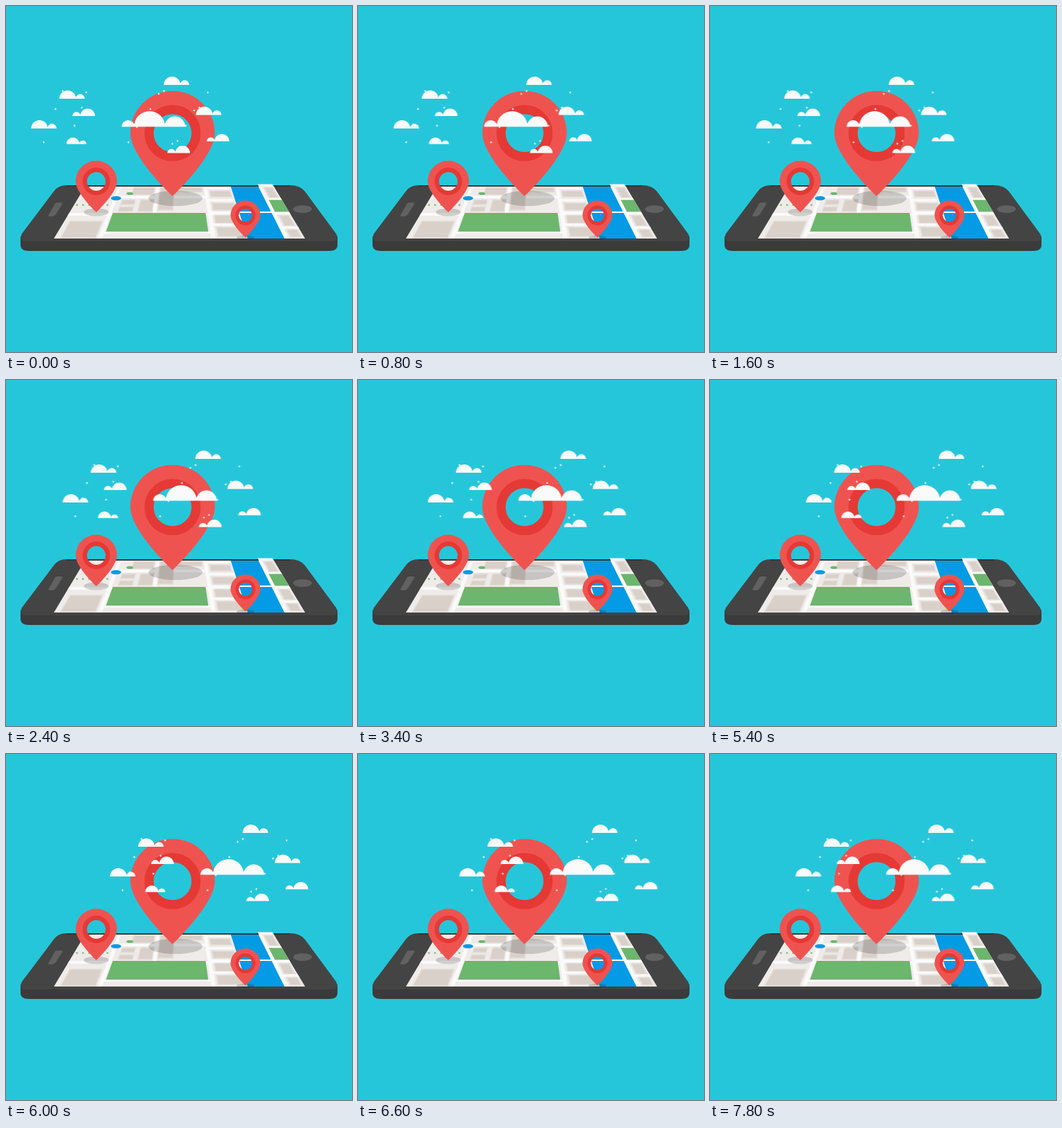
Recreate the animation shown at these times as an HTML page. Size 500 by 500 pixels, loop 8 s.

```html
<!DOCTYPE html>
<html lang="en">
<head>
<meta charset="utf-8">
<title>Map pins on a phone</title>
<style>
  html, body { margin: 0; width: 100%; height: 100%; overflow: hidden; background: #26c6da; }
  svg { display: block; width: 100%; height: 100%; }
  /* The sky moves in 200 ms steps: 31 to the right, then back. */
  #sky { fill: #fafafa; animation: drift 8s infinite; }
  @keyframes drift {
    0% { transform: translateX(0); animation-timing-function: steps(31); }
    77.5% { transform: translateX(117.8px); animation-timing-function: steps(9); }
    100% { transform: translateX(83.6px); }
  }
  .land { fill: #efebe9; }
  .block { fill: #d9d0c9; stroke: #e5dfda; stroke-width: 1.6; }
  .road { fill: #fafafa; }
  .park { fill: #6cb66e; }
  .water { fill: #039be5; }
  .shade { opacity: .17; }
  .key { fill: #616161; }
</style>
</head>
<body>
<svg viewBox="0 0 500 500">
  <defs>
    <g id="pin">
      <path fill="#ef5350" fill-rule="evenodd" d="M0 91S-61 34-61 0A61 61 0 0 1 61 0C61 34 0 91 0 91ZM-34 0A34 34 0 0 0 34 0A34 34 0 0 0-34 0Z"/>
      <circle r="34" fill="none" stroke="#e53935" stroke-width="13.2"/>
    </g>
    <path id="cloud" d="M-12 0A12 12 0 0 1 12 0ZM11.500 0A6.700 6.700 0 0 1 24.900 0Z"/>
    <path id="star" d="M0-2 .6-.6 2 0 .6.6 0 2-.6.6-2 0-.6-.6Z"/>
  </defs>

  <path fill="#3b3b3b" d="M21 333V345Q21 354 33 354H467Q479 354 479 345V333L400 300H100Z"/>
  <path fill="#444" d="M88 259H410Q425 259 432 268L477 329Q482 340 471 340H29Q18 340 23 329L69 268Q75 259 88 259Z"/>
  <path fill="#353535" d="M88 259H410V261H88Z"/>
  <path class="key" d="M73 284H79Q83 284 81 287L72 301Q70 304 67 304H63Q60 304 62 301L70 287Q71 284 73 284Z"/>
  <ellipse class="key" cx="428.5" cy="293.5" rx="13.5" ry="5.5"/>

  <g id="map"></g>
  <ellipse class="water" cx="159" cy="277.8" rx="7.5" ry="3"/>
  <ellipse class="park" cx="179" cy="271" rx="5" ry="2"/>
  <path stroke="#6cb66e" stroke-width="2.6" stroke-linecap="round" stroke-dasharray="0 8.8" d="M102.500 287.500H148"/>

  <ellipse class="shade" cx="245" cy="278" rx="39" ry="11"/>
  <ellipse class="shade" cx="130.5" cy="298" rx="18" ry="5.5"/>
  <ellipse class="shade" cx="346" cy="334.8" rx="13" ry="3"/>

  <use href="#pin" transform="translate(240.700 183.700)"/>
  <use href="#pin" transform="translate(130.500 253.500) scale(.49)"/>
  <use href="#pin" transform="translate(346 302.500) scale(.353)"/>

  <g id="sky">
    <use href="#cloud" transform="translate(240 114)"/>
    <use href="#cloud" transform="translate(89 134)"/>
    <use href="#cloud" transform="translate(48.300 177)"/>
    <use href="#cloud" transform="translate(286.500 157.500)"/>
    <use href="#cloud" transform="translate(96.700 199.500) scale(.79)"/>
    <use href="#cloud" transform="translate(118 159) scale(-.89 .89)"/>
    <use href="#cloud" transform="translate(312 195.600) scale(-.89 .89)"/>
    <use href="#cloud" transform="translate(255.300 212.500) scale(-.89 .89)"/>
    <path d="M167 174.500a9.500 9.500 0 0 1 19 0ZM185 174.500a22.500 22.500 0 0 1 45 0ZM229 174.500a15 15 0 0 1 30 0Z"/>
  </g>
</svg>
<script>
  const add = (parent, name, attributes) => {
    const node = document.createElementNS("http://www.w3.org/2000/svg", name);
    for (const key in attributes) node.setAttribute(key, attributes[key]);
    document.getElementById(parent).append(node);
  };

  // Map sides converge upwards; u runs from -1 (left edge) to 1 (right edge).
  const project = (u, y) => `${250.7 + u * (136.5 + 0.6 * (y - 261))} ${y}`;
  const tile = (type, u0, u1, y0, y1) => add("map", "path", {
    class: type,
    d: `M${project(u0, y0)}L${project(u1, y0)}L${project(u1, y1)}L${project(u0, y1)}Z`
  });

  tile("land", -1, 1, 261, 336);
  tile("road", -1, 0.54, 299, 303);
  tile("road", -0.65, 0.28, 326, 329);
  tile("road", -0.6, 0.28, 274, 278);
  for (const u of [-0.65, -0.245, 0.255]) tile("road", u, u + 0.035, 261, u === -0.245 ? 299 : 336);

  tile("block", -0.95, -0.67, 311, 335);
  tile("block", -0.48, -0.26, 262, 273);
  for (const y of [280, 290]) tile("block", -0.56, -0.43, y, y + 7);
  tile("block", -0.38, -0.25, 280, 297);
  tile("block", -0.2, -0.06, 262, 295);
  tile("block", -0.04, 0.235, 262, 269);
  tile("park", -0.605, 0.237, 299, 326);

  for (let row = 0; row < 4; row++) {
    const y = 267 + 17.6 * row, depth = 9 + 1.5 * row;
    tile("block", 0.31, 0.52, y, y + depth);
    tile("road", 0.28, 0.54, y - 5.5, y - 2);

    const top = 262 + 20.3 * row, bottom = Math.min(top + 15, 334);
    tile("road", 0.84, 1, top - 4.5, top - 1);
    if (row === 1) tile("park", 0.87, 1, top - 2, bottom);
    else tile("block", 0.89, 0.98, top, bottom);
  }

  tile("water", 0.543, 0.837, 261, 336);
  tile("road", 0.837, 0.87, 261, 336);
  tile("road", 0.54, 0.84, 297, 299);

  // Evenly spread stars: steps of irrational ratios never line up.
  const scatter = (count, left, width) => {
    for (let i = 1; i <= count; i++) {
      const x = left + width * (i * 0.618 % 1), y = 121 + 98 * (i * 0.755 % 1);
      add("sky", "use", { href: "#star", x, y });
    }
  };
  scatter(8, 48, 72);
  scatter(12, 165, 134);
</script>
</body>
</html>
```
